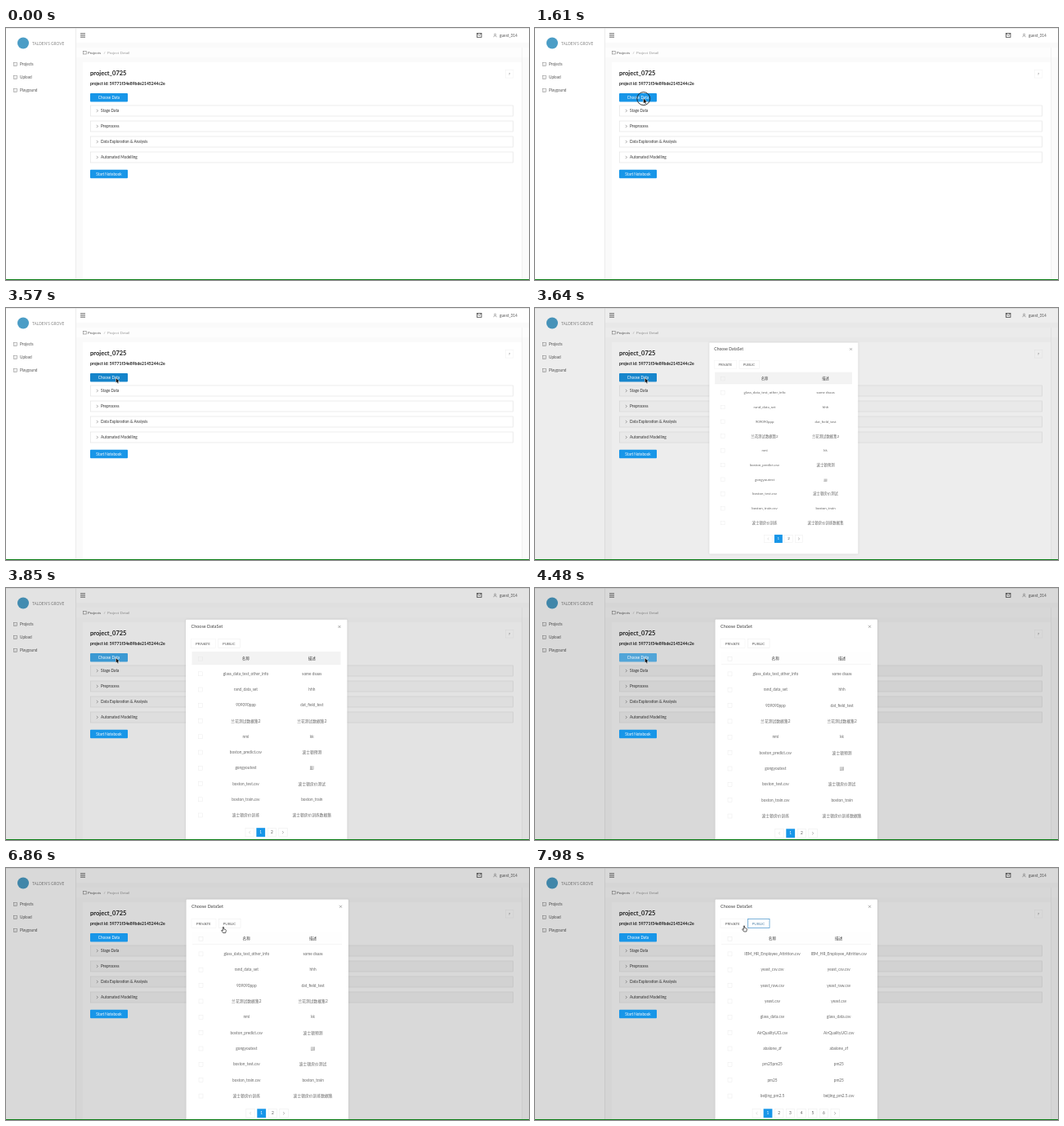
An HTML page with a canvas for the animation above (8000 ms loop, 640 by 309 pixels).

```html
<!DOCTYPE html>
<html lang="en">
<head>
<meta charset="utf-8">
<title>Project detail</title>
<style>
html, body { margin: 0; width: 100%; height: 100%; overflow: hidden; background: #fff; }
canvas { display: block; width: 100vw; height: 100vh; }
</style>
</head>
<body>
<canvas id="stage"></canvas>
<script>
const W = 640, H = 309, LOOP = 8000;
const FONT = 'Lato, "Noto Sans CJK SC", "Noto Sans CJK", sans-serif';
const BLUE = [24, 150, 232];
const canvas = document.getElementById('stage');
const ctx = canvas.getContext('2d');

const PRIVATE_ROWS = [
  ['glass_data_test_other_info', 'some dsaas'],
  ['rand_data_set', 'hhh'],
  ['909090ppp', 'dat_field_test'],
  ['兰花测试数据集2', '兰花测试数据集2'],
  ['nmi', 'kk'],
  ['boston_predict.csv', '波士顿预测'],
  ['gongyoutest', 'jjjj'],
  ['boston_test.csv', '波士顿房价测试'],
  ['boston_train.csv', 'boston_train'],
  ['波士顿房价训练', '波士顿房价训练数据集']
];
const PUBLIC_ROWS = [
  ['IBM_HR_Employee_Attrition.csv', 'IBM_HR_Employee_Attrition.csv'],
  ['yeast_csv.csv', 'yeast_csv.csv'],
  ['yeast_raw.csv', 'yeast_raw.csv'],
  ['yeast.csv', 'yeast.csv'],
  ['glass_data.csv', 'glass_data.csv'],
  ['AirQualityUCI.csv', 'AirQualityUCI.csv'],
  ['abalone_zf', 'abalone_zf'],
  ['pm25pm25', 'pm25'],
  ['pm25', 'pm25'],
  ['beijing_pm2.5', 'beijing_pm2.5.csv']
];

// Keyframes: [time, value...]
const POINTER = [
  [210, 308, 301], [490, 163, 143], [800, 142, 104], [1260, 132.8, 86.6],
  [1960, 132.8, 86.6], [2730, 134.6, 86], [4830, 134.6, 86], [5390, 230, 94],
  [5600, 230, 94], [5880, 262, 96], [6440, 262, 96], [6860, 266, 72.5],
  [7000, 266, 72.5], [7210, 268, 67.5], [7490, 268, 67.5], [7910, 256, 71]
];
const CHOOSE_COLOR = [
  [2730, ...BLUE], [3000, 50, 163, 238], [3360, 50, 163, 238], [3500, 18, 130, 200],
  [3640, 24, 134, 204], [3990, 82, 165, 216], [4830, 82, 165, 216], [5110, ...BLUE]
];
// Click rings: [start, end, first radius, last radius]
const RINGS = [[1610, 1820, 8, 8], [3150, 3430, 8, 11], [7200, 7420, 10, 12]];

const mix = (a, b, p) => a + (b - a) * p;
const clamp = v => Math.max(0, Math.min(1, v));
const easeOut = p => 1 - (1 - p) ** 3;
const rgb = c => `rgb(${c.map(Math.round).join()})`;

function keyed(keys, t, ease = p => p) {
  if (t <= keys[0][0]) return keys[0].slice(1);
  const i = keys.findIndex(k => k[0] > t);
  if (i < 0) return keys[keys.length - 1].slice(1);
  const a = keys[i - 1], b = keys[i];
  const p = ease((t - a[0]) / (b[0] - a[0]));
  return a.slice(1).map((v, j) => mix(v, b[j + 1], p));
}

function text(str, x, y, size = 4.7, color = '#555', align = 'left', weight = 400) {
  ctx.font = `${weight} ${size}px ${FONT}`;
  ctx.textAlign = align;
  ctx.textBaseline = 'alphabetic';
  ctx.fillStyle = color;
  ctx.fillText(str, x, y + size * 0.34);
}

function fill(x, y, w, h, color) {
  ctx.fillStyle = color;
  ctx.fillRect(x, y, w, h);
}

function frame(x, y, w, h, color, width = 0.6) {
  ctx.strokeStyle = color;
  ctx.lineWidth = width;
  ctx.strokeRect(x, y, w, h);
}

function path(points, color, width = 0.6) {
  ctx.beginPath();
  points.forEach(([x, y]) => ctx.lineTo(x, y));
  ctx.strokeStyle = color;
  ctx.lineWidth = width;
  ctx.stroke();
}

function circle(x, y, r) {
  ctx.beginPath();
  ctx.arc(x, y, r, 0, Math.PI * 2);
}

function chevron(x, y, dir, color) {
  path([[x - dir, y - 1.6], [x + dir * 0.7, y], [x - dir, y + 1.6]], color, 0.55);
}

function button(label, y, color) {
  ctx.beginPath();
  ctx.roundRect(103, y, 46, 10.5, 1);
  ctx.fillStyle = color;
  ctx.fill();
  text(label, 126, y + 5.2, 4.65, '#fff', 'center');
}

function sidebar() {
  fill(0, 0, 85, H, '#fff');
  fill(85, 0, 1, H, '#ececec');
  circle(21, 18.5, 7);
  ctx.fillStyle = '#4b9dc6';
  ctx.fill();
  text("TALDEN'S GROVE", 32, 19.7, 4.8, '#888');
  ['Projects', 'Upload', 'Playgound'].forEach((label, i) => {
    const y = 44.5 + i * 16;
    frame(9.6, y - 2, 4, 3.8, '#888', 0.55);
    path([[10.5, y + 0.6], [12.7, y + 0.6]], '#999', 0.5);
    text(label, 17, y);
  });
}

function topBar() {
  fill(86, 0, W - 86, 18, '#fff');
  for (const y of [6.8, 9, 11.2]) path([[91, y], [97, y]], '#444', 0.8);
  frame(576.3, 6.5, 5.6, 4.8, '#444', 0.8);
  path([[576.3, 6.8], [579.1, 9.2], [581.9, 6.8]], '#444', 0.7);
  circle(598.5, 7.9, 1);
  ctx.strokeStyle = '#777';
  ctx.lineWidth = 0.5;
  ctx.stroke();
  path([[596.7, 11.2], [597.2, 9.7], [599.8, 9.7], [600.3, 11.2]], '#777', 0.5);
  text('guest_314', 604, 9.2, 4.75);
}

function page() {
  fill(0, 0, W, H, '#fafafa');
  fill(86, 24, W - 86, 12, '#fdfdfd');
  fill(94, 42, 537, H - 42, '#fff');
  fill(631, 24, 0.6, H, '#ececec');
  sidebar();
  topBar();
  fill(0, 0, W, 0.7, '#e0e0e0');
  frame(94.4, 28.4, 3.8, 3.6, '#777', 0.55);
  text('Projects', 100, 30.5, 4.6);
  text('/', 120.5, 30.5, 4.6, '#999', 'center');
  text('Project Detail', 124, 30.5, 4.6, '#999');
  text('project_0725', 103, 55.5, 7.5, '#222', 'left', 700);
  text('project id: 59771f34e89bde2145244c2e', 103, 68, 5.05, '#222', 'left', 700);
  frame(611.3, 51.3, 9.6, 9.8, '#f0f0f0', 0.5);
  text('?', 616, 56.5, 4.4, '#666', 'center');
}

function panels(dim) {
  ['Stage Data', 'Preprocess', 'Data Exploration & Analysis', 'Automated Modelling'].forEach((label, i) => {
    const y = 101.5 + i * 19;
    fill(103.5, y - 6.5, 517, 13, `rgba(0,0,0,${dim * 0.2})`);
    frame(103.5, y - 6.5, 517, 13, '#e4e4e4', 0.7);
    chevron(111.8, y, 1, '#666');
    text(label, 116, y, 4.72, '#333');
  });
}

function pager(count) {
  const step = 13.7, y = 300.8;
  const start = count === 2 ? 299 : 271.3;
  for (let i = 0; i <= count + 1; i++) {
    const x = start + i * step;
    const active = i === 1;
    if (active) fill(x - 5.4, y - 5.5, 10.8, 11, rgb(BLUE));
    else frame(x - 5.2, y - 5.2, 10.4, 10.4, '#ebebeb', 0.5);
    if (i === 0) chevron(x, y, -1, '#c4c4c4');
    else if (i > count) chevron(x, y, 1, '#777');
    else text(String(i), x, y, 4.8, active ? '#fff' : '#555', 'center');
  }
}

function modal(isPublic, opening) {
  const rows = isPublic ? PUBLIC_ROWS : PRIVATE_ROWS;
  const shift = isPublic ? -3.8 : 0;
  const nameX = 294.3 + shift, noteX = 375.6 + shift;
  ctx.save();
  ctx.shadowColor = 'rgba(0,0,0,.12)';
  ctx.shadowBlur = 3;
  ctx.beginPath();
  ctx.roundRect(220.5, 38.5, 198.5, 282.5, 1.2);
  ctx.fillStyle = '#fff';
  ctx.fill();
  ctx.restore();

  text('Choose DataSet', 227, 47.2, 5.5, '#444');
  path([[408, 45.8], [411, 48.8]], '#777', 0.6);
  path([[411, 45.8], [408, 48.8]], '#777', 0.6);

  frame(227, 62.5, 30, 11, '#f2f2f2', 0.5);
  frame(260.5, 62.5, 26.5, 11, isPublic ? '#5b9fd0' : '#ebebeb', isPublic ? 0.8 : 0.5);
  text('PRIVATE', 241.6, 68, 4.6, '#555', 'center');
  text('PUBLIC', 273.5, 68, 4.6, isPublic ? '#4d7fa6' : '#555', 'center');

  fill(228, 78, 183, 16, opening ? '#f3f3f3' : '#fefefe');
  fill(228, 93, 183, 0.6, '#f0f0f0');
  frame(236, 84.2, 5, 5, '#e6e6e6', 0.5);
  text('名称', nameX, 86.5, 4.7, '#444', 'center', 500);
  text('描述', noteX, 86.5, 4.7, '#444', 'center', 500);
  rows.forEach(([name, note], i) => {
    const y = 105.4 + i * 19.35;
    frame(236, y - 2.5, 5, 5, '#ebebeb', 0.5);
    text(name, nameX, y, 4.8, '#666', 'center');
    text(note, noteX, y, 4.8, '#666', 'center');
  });
  pager(isPublic ? 6 : 2);
}

function shape(points, x, y) {
  ctx.beginPath();
  points.forEach(([px, py]) => ctx.lineTo(x + px, y + py));
  ctx.closePath();
}

function pointer(t) {
  if (t < 210) return;
  const [x, y] = keyed(POINTER, t, p => p * (2 - p));
  for (const [start, end, r0, r1] of RINGS) {
    if (t < start || t >= end) continue;
    circle(x, y, mix(r0, r1, (t - start) / (end - start)));
    ctx.strokeStyle = '#222';
    ctx.lineWidth = 0.9;
    ctx.stroke();
  }
  ctx.lineJoin = 'round';
  if (t >= 6650) {
    shape([[-0.7, 0], [0.5, 0], [0.6, 2.5], [2.8, 3], [3.4, 4], [2.7, 7], [-0.4, 7], [-2.4, 4], [-1.6, 3.6], [-0.7, 4.5]], x, y);
    ctx.fillStyle = '#fff';
    ctx.fill();
    ctx.strokeStyle = '#222';
    ctx.lineWidth = 0.7;
    ctx.stroke();
  } else {
    shape([[0, 0], [0, 5.6], [1.3, 4.4], [2.2, 6.4], [3.1, 6], [2.2, 4.1], [4, 4]], x, y);
    ctx.strokeStyle = '#fff';
    ctx.lineWidth = 1;
    ctx.stroke();
    ctx.fillStyle = '#111';
    ctx.fill();
  }
  ctx.lineJoin = 'miter';
}

function draw(t) {
  const open = t >= 3640;
  const dim = open ? mix(0.07, 0.15, clamp((t - 3640) / 420)) : 0;
  page();
  panels(dim);
  fill(0, 0, W, H, `rgba(0,0,0,${dim})`);
  button('Choose Data', 80, rgb(keyed(CHOOSE_COLOR, t)));
  button('Start Notebook', 173.8, rgb(BLUE));
  if (open) {
    // The dialog grows out of the click position.
    const scale = mix(0.917, 1, easeOut(clamp((t - 3640) / 350)));
    ctx.save();
    ctx.translate(134, 86);
    ctx.scale(scale, scale);
    ctx.translate(-134, -86);
    modal(t >= 7490, scale < 1);
    ctx.restore();
  }
  pointer(t);
  fill(0, 308, W, 1, '#0b7d16');
}

function resize() {
  const ratio = window.devicePixelRatio || 1;
  canvas.width = Math.round(innerWidth * ratio);
  canvas.height = Math.round(innerHeight * ratio);
}

let origin = null;
function tick(now) {
  if (origin === null) origin = now;
  ctx.setTransform(canvas.width / W, 0, 0, canvas.height / H, 0, 0);
  draw((now - origin) % LOOP);
  requestAnimationFrame(tick);
}

addEventListener('resize', resize);
resize();
requestAnimationFrame(tick);
</script>
</body>
</html>
```
